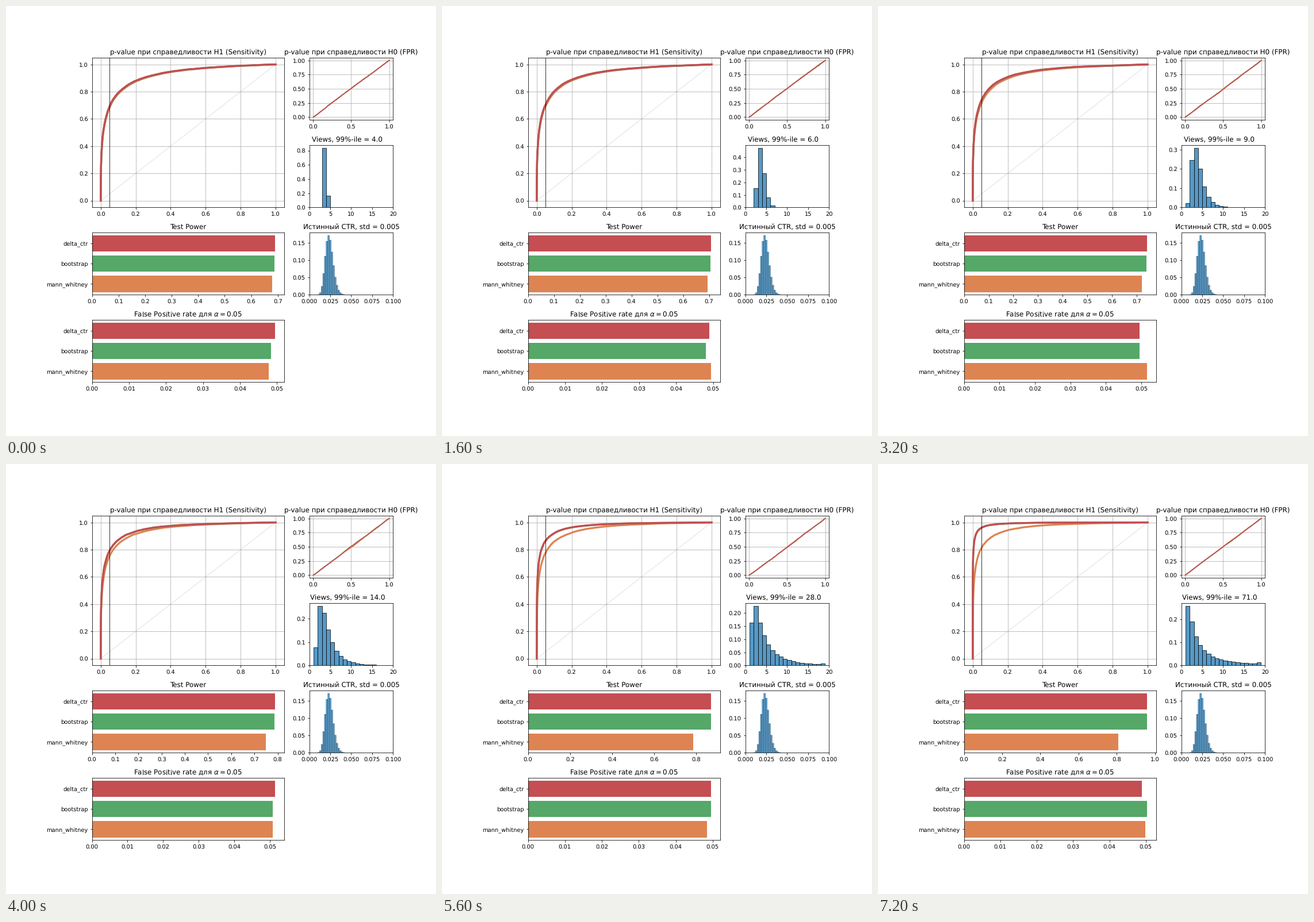
Animation of 748x748 px, one loop 8000 ms. Source, as a matplotlib script:

```python
import math

import matplotlib.pyplot as plt
import numpy as np
from matplotlib.animation import FuncAnimation

SIZE, DPI = 748, 72
COLORS = {"mann_whitney": "#DD8452", "bootstrap": "#55A868", "delta_ctr": "#C44E52"}
BLUE = ("#1f77b4", 0.75)
SAMPLES = 2000
Z_ALPHA = 1.96

# Key points, one per step: spread of the views, false positive level.
SKEW = [0.1, 0.2, 0.3, 0.4, 0.5, 0.7, 0.9, 1.0, 1.2, 1.4]
FPR_LEVEL = [0.0495, 0.0495, 0.049, 0.044, 0.0495, 0.0515, 0.0405, 0.0495, 0.049, 0.049]

Z = np.linspace(-5, 5, 4001)
PHI = np.array([0.5 * (1 + math.erf(z / math.sqrt(2))) for z in Z])

plt.rcParams.update({"font.size": 9.9, "text.hinting": "none"})


def cdf(z):
    return np.interp(z, Z, PHI)


def quantile(p):
    return np.interp(p, PHI, Z)


def effect_sizes(skew):
    """Shift of each test statistic under H1, in standard deviations."""
    ranked = 2.42 + 0.45 * (1 - math.exp(-1.3 * skew ** 2))
    delta = 2.45 + 0.64 * skew ** 2
    return np.array([ranked, delta - 0.008, delta])


def noisy_ranks(rng, noise):
    """Evenly spread ranks with a part of the scatter of a real sample."""
    even = (np.arange(SAMPLES) + 0.5) / SAMPLES
    return even + noise * (np.sort(rng.random(SAMPLES)) - even)


def plot_ecdf(ax, values, color, width):
    x = np.concatenate([[0], np.sort(values), [1]])
    ax.plot(x, np.linspace(0, 1, len(x)), color=color, lw=width)


def view_shares(skew):
    """Shares of 1..19 views for floor(lognormal) + 1; 18 and 19 share a bar."""
    upper = cdf((np.log(np.arange(1, 20)) - 1) / skew)
    shares = np.diff(upper, prepend=0) / upper[-1]
    return np.append(shares[:17], shares[17:].sum())


def beta_shares(a=25.5, b=1040, bins=50, top=0.1, fine=20):
    x = (np.arange(bins * fine) + 0.5) * top / (bins * fine)
    density = np.exp((a - 1) * np.log(x) + (b - 1) * np.log1p(-x) + 70)
    return (density / density.sum()).reshape(bins, fine).sum(axis=1)


CTR = beta_shares()

fig = plt.figure(figsize=(SIZE / DPI, SIZE / DPI), dpi=DPI, facecolor="white")
grid = fig.add_gridspec(4, 3, left=0.2, right=0.9, top=0.88, bottom=0.125,
                        wspace=0.3, hspace=0.4)
ax_h1 = fig.add_subplot(grid[:2, :2])
ax_h0 = fig.add_subplot(grid[0, 2])
ax_views = fig.add_subplot(grid[1, 2])
ax_ctr = fig.add_subplot(grid[2, 2])
ax_power = fig.add_subplot(grid[2, :2])
ax_fpr = fig.add_subplot(grid[3, :2])


def draw_curves(effects, rng):
    ranks_h1 = noisy_ranks(rng, 0.3)
    ranks_h0 = noisy_ranks(rng, 0.6)
    ranked_test_h0 = noisy_ranks(rng, 0.6)

    ax_h1.plot([0, 1], [0, 1], color="black", alpha=0.12, lw=1)
    for name, effect in zip(COLORS, effects):
        p_values = 2 * cdf(-np.abs(effect - quantile(ranks_h1)))
        p_null = ranked_test_h0 if name == "mann_whitney" else ranks_h0
        plot_ecdf(ax_h1, p_values, COLORS[name], 3.3)
        plot_ecdf(ax_h0, p_null, COLORS[name], 1.7)
    ax_h1.axvline(0.05, color="black", alpha=0.8, lw=1)
    ax_h1.set_title("p-value при справедливости H1 (Sensitivity)")
    ax_h0.set_title("p-value при справедливости H0 (FPR)")
    for ax in (ax_h1, ax_h0):
        ax.set_xlim(-0.05, 1.05)
        ax.set_ylim(-0.05, 1.05)
        ax.grid(True)


def draw_histograms(skew):
    ax_views.bar(np.arange(1, 19), view_shares(skew), width=1, align="edge",
                 color=BLUE, edgecolor="black", lw=0.75)
    ax_views.set_xlim(0, 20)
    top = str(math.floor(math.exp(1 + 2.3263 * skew)) + 1)
    ax_views.set_title(f"Views, 99%-ile = {top}.0", x=0.44 + 0.01 * len(top))

    ax_ctr.bar(np.arange(50) * 0.002, CTR, width=0.002, align="edge",
               color=BLUE, edgecolor="black", lw=0.26, snap=False)
    ax_ctr.set_xlim(0, 0.1)
    ax_ctr.set_title("Истинный CTR, std = 0.005")


def draw_bars(ax, values, title):
    ax.barh(list(COLORS), values, color=list(COLORS.values()))
    ax.set_title(title)


def draw(step):
    rng = np.random.default_rng(40 + step)
    effects = effect_sizes(SKEW[step])
    scatter = rng.normal(0, [0.0015, 0.001, 0])
    for ax in fig.axes:
        ax.clear()
    draw_curves(effects, rng)
    draw_histograms(SKEW[step])
    draw_bars(ax_power, cdf(effects - Z_ALPHA), "Test Power")
    draw_bars(ax_fpr, FPR_LEVEL[step] + scatter,
              r"False Positive rate для $\alpha=0.05$")
    return []


anim = FuncAnimation(fig, draw, frames=len(SKEW), init_func=lambda: [],
                     interval=800, repeat=True, blit=False)
plt.show()
```
